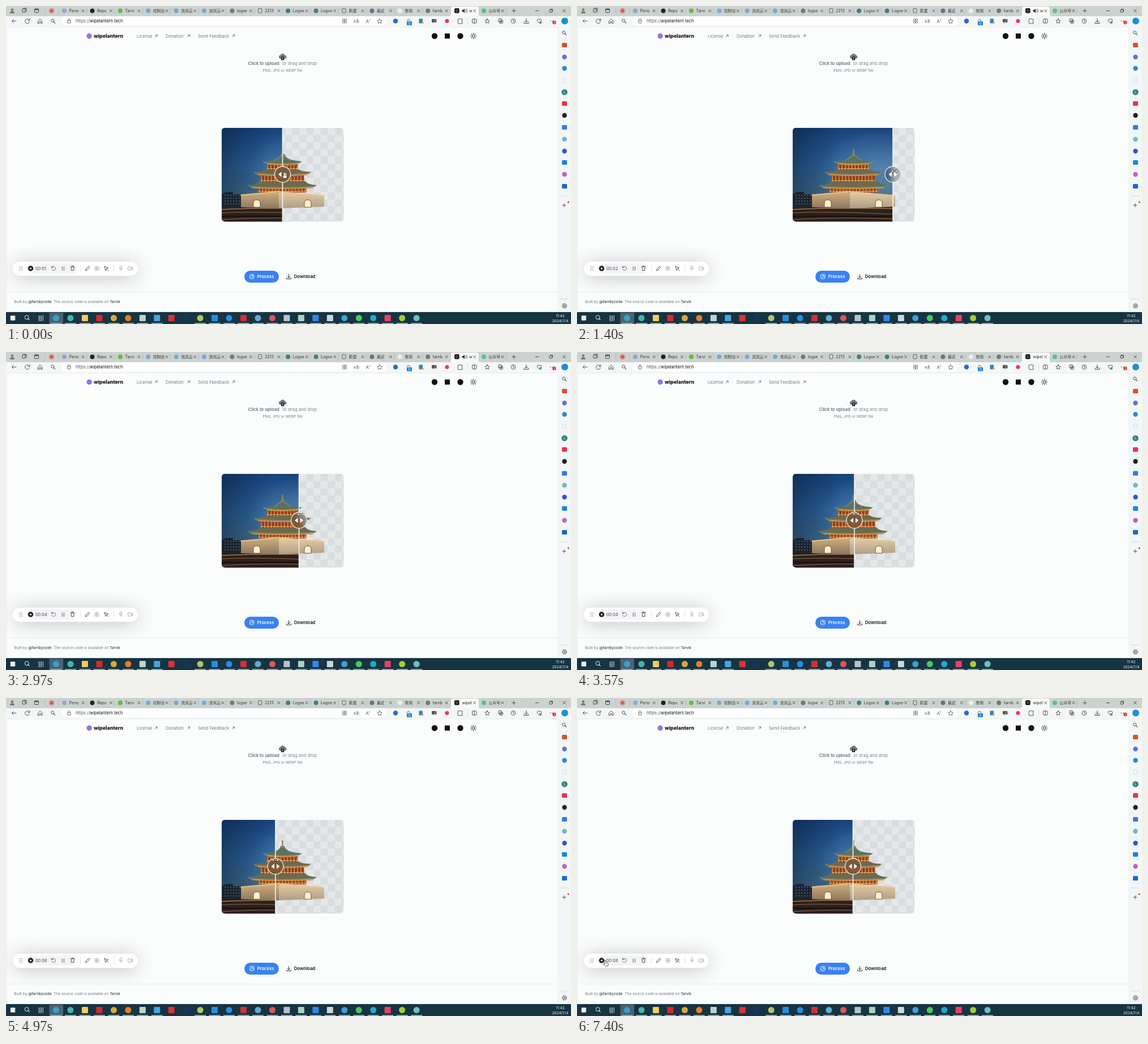
An HTML page that plays this animation: 998 px wide and 561 px high, repeating every 7.43 s.

```html
<!DOCTYPE html>
<html lang="en">
<head>
<meta charset="utf-8">
<title>Background remover</title>
<style>
html, body { margin: 0; width: 100%; height: 100%; overflow: hidden; background: #fbfdfd; }
svg { display: block; width: 100%; height: 100%; }
text { font-family: Inter, "Noto Sans CJK SC", "Noto Sans CJK", sans-serif; }
</style>
</head>
<body>
<svg id="stage" viewBox="0 0 998 561"></svg>
<script>
const LOOP = 7430;
const stage = document.getElementById('stage');

// Drawing helpers, each returns SVG markup
const rect = (x, y, w, h, fill, r = 0, more = '') =>
  `<rect x="${x}" y="${y}" width="${w}" height="${h}" rx="${r}" fill="${fill}" ${more}/>`;
const dot = (x, y, r, fill, more = '') =>
  `<circle cx="${x}" cy="${y}" r="${r}" fill="${fill}" ${more}/>`;
const shape = (d, fill, more = '') => `<path d="${d}" fill="${fill}" ${more}/>`;
const line = (d, color = '#444', w = .9, more = '') =>
  `<path d="${d}" fill="none" stroke="${color}" stroke-width="${w}" stroke-linecap="round" stroke-linejoin="round" ${more}/>`;
const dashes = (x1, x2, y, color, w, pattern) =>
  `<path d="M${x1} ${y}H${x2}" stroke="${color}" stroke-width="${w}" stroke-dasharray="${pattern}"/>`;
const text = (x, y, s, size = 7.5, fill = '#222', more = '') =>
  `<text x="${x}" y="${y}" font-size="${size}" fill="${fill}" ${more}>${s}</text>`;
const ring = (x, y, r, color = '#444', w = .9) => dot(x, y, r, 'none', `stroke="${color}" stroke-width="${w}"`);
const box = (x, y, w, h, color = '#444', r = 1) => rect(x, y, w, h, 'none', r, `stroke="${color}" stroke-width=".9"`);
const cross = (x, y, r = 2, color = '#333') => line(`M${x - r} ${y - r}l${2 * r} ${2 * r}m0 ${-2 * r}l${-2 * r} ${2 * r}`, color, .8);
const plus = (x, y, r = 3) => line(`M${x - r} ${y}h${2 * r}M${x} ${y - r}v${2 * r}`);
const lens = (x, y, color = '#444', r = 2.6) => ring(x - .8, y - .8, r, color) + line(`M${x + 1.2} ${y + 1.2}l2.5 2.5`, color, 1.1);
const gear = (x, y, color = '#333') => ring(x, y, 1.5, color) + dot(x, y, 3.6, 'none', `stroke="${color}" stroke-width="1.3" stroke-dasharray="1.8 1"`);
const download = (x, y, color = '#333') => line(`M${x} ${y - 4}v6m-2.5-2.5l2.5 2.5 2.5-2.5M${x - 4} ${y + 2}v2h8v-2`, color);

function tabBar() {
  const tabs = [
    ['Perio', '#8fa6d6'], ['Repo', '#222'], ['Tarvi', '#61bf36'], ['控制台', '#72a9dc'],
    ['流岚云', '#72a9dc'], ['流岚云', '#72a9dc'], ['logse', '#777'], ['2213', '#fff'],
    ['Logse', '#437c83'], ['Logse', '#437c83'], ['新建', '#fff'], ['最近', '#607781'],
    ['常用', '#eee'], ['farnb', '#777'], ['', '#111'], ['公众号', '#52c38c']
  ];
  let out = rect(0, 0, 998, 18, '#cbd2cf') +
    dot(11, 6.4, 2.2, '#777') + shape('M7 13q0-4 4-4t4 4z', '#777') +
    box(29, 5, 5, 6, '#333') + line('M31 4h5v6', '#333') +
    box(50.5, 5, 7, 6.5, '#333') + line('M51 6.2h6', '#333', 1.6) +
    ring(80.5, 8.5, 4, '#e23d35') + dot(80.5, 8.5, 2.5, '#e23d35') + line('M68.5 4v9M93 4v9', '#a5acaa', .6) +
    shape('M783 18q3 0 3-3V4q0-3 3-3h43q3 0 3 3v11q0 3 3 3z', '#f8faf9');
  tabs.forEach(([name, color], i) => {
    const close = 136 + 49.4 * i, x = close - 33;
    out += i === 14
      ? rect(x - 2.5, 4, 8.5, 8.5, color, 2) + ring(x + 1.7, 8.2, 1.8, '#bbb', .7)
      : color === '#fff' ? box(x - 3, 4.5, 6, 7.5, '#555') : dot(x, 8.5, 4, color);
    out += text(x + 8.5, 11, name, 6.9, '#333') + cross(close, 8.5);
    if (i < 13 || i === 15) out += line(`M${close + 6.5} 4v9`, '#a5acaa', .6);
  });
  return out + text(819, 11, 'w', 6.9, '#222', 'id="title"') +
    `<g id="sound">${shape('M805.5 7h2l2.5-2.5v8l-2.5-2.5h-2z', '#333')}${line('M811.5 6.5q1.5 2 0 4m1.5-5.5q2.8 3.5 0 7', '#333', .8)}</g>` +
    plus(897, 8.5) + line('M935.5 8.5h5', '#333') + box(960, 6.5, 4.5, 4.5, '#333') +
    line('M961.5 5.5h4v4', '#333', .7) + cross(986, 8.5, 2.4);
}

function toolBar() {
  return rect(0, 17, 998, 21, '#f5f7f7') + rect(98, 18.5, 574, 16, '#fff', 8) +
    line('M18 26.5h-7.5l3-3m-3 3l3 3') + line('M41.3 25a4 4 0 1 0 .2 3M41.8 22.5v3h-3') +
    line('M56.5 26.5l3.8-3.8 3.8 3.8v4h-2.5v-3h-2.6v3h-2.5z') + lens(83, 26.5) +
    box(108.5, 25.5, 5.5, 4.5, '#555') + line('M109.5 25v-1.5q1.8-2.5 3.6 0V25', '#555', .8) +
    text(123, 29.2, 'https://<tspan fill="#111">wipelantern.tech</tspan>', 7.4, '#555') +
    [0, 4].map(d => box(594.5 + d, 23, 3, 3, '#777', .3) + box(594.5 + d, 27, 3, 3, '#777', .3)).join('') +
    text(614, 29, 'aあ', 6.5, '#555') + text(635.5, 29.5, 'A', 8, '#555') + line('M642 23q2 1.5 0 3', '#555', .7) +
    line('M660 22.5l1.3 2.7 3 .4-2.2 2.1.6 3-2.7-1.5-2.7 1.5.6-3-2.2-2.1 3-.4z', '#555', .8) +
    dot(688, 26.5, 4.2, '#246bd2') + line('M708 26q3-5 6 0') + rect(708, 27, 9, 7, '#1683df', 1) +
    text(710.7, 33, '0', 6, '#fff') + rect(729.5, 22.5, 6.5, 8, '#2486c9', 1) + dot(736, 29.5, 1.8, '#eba62b') +
    rect(752, 23, 8.5, 6, '#555', 1) + line('M754 31l5-7', '#aaa', 1) + dot(779, 26.5, 3.5, '#ef354c') +
    line('M799 23h2q1-2 2 0h3v3q-2 1 0 2v3h-7l-1-4z') + line('M815.5 21v11', '#ccc', .6) +
    box(823.5, 23, 7.5, 7, '#444') + line('M827.2 22.5v8') + line('M850 22.5l1.2 2.5 2.8.4-2 2 .5 2.8-2.5-1.3-2.5 1.3.5-2.8-2-2 2.8-.4z') +
    box(870, 22.5, 5.5, 5.5) + box(872, 25, 5.5, 5.5) + plus(874.7, 27.7, 1.5) +
    ring(896, 26.5, 3.9) + line('M896 24v2.8h2') + download(919, 26.5) +
    line('M942 30l-3.6-3.5q-.7-4 2.5-3.2l1.1 1 1.1-1q3.2-.8 2.5 3.2z') + dot(944, 29, 2.2, '#48a66d') +
    [961.5, 965, 968.5].map(x => dot(x, 26.5, .7, '#333')).join('') + dot(968.5, 29, 3.2, '#d42d35') + text(967.3, 31.3, '3', 5, '#fff') +
    dot(987, 26.5, 6, '#1b91d3');
}

function sideBar() {
  const marks = [[69, '#d6522c', 1], [90, '#6270d9'], [110, '#258bd0'], [152, '#34847e'], [172, '#f12d50', 1], [193, '#222'],
    [214, '#337bea', 1], [235, '#6bb9c8'], [256, '#3651d4'], [276, '#1685ef', 1], [297, '#bd65b7'], [318, '#176ad8', 1]];
  return rect(975, 37, 23, 503, '#f3f6f6') + lens(986, 47.5) +
    marks.map(([y, c, square]) => square ? rect(982, y - 4, 9, 8, c, 1.5) : dot(986.5, y, y === 152 ? 5.3 : 4.2, c)).join('') +
    box(983.5, 127, 6, 8, '#d4d9da') + text(985, 154.3, 'L', 5.8, '#fff') +
    line('M979 335h15M979 517h15', '#ccc', .7) + plus(986, 351.5) + dot(993.3, 346, 1.6, '#e32d3e') + gear(986.5, 529);
}

function page() {
  const arrow = x => line(`M${x - 2} 55l4-4h-3m3 0v3`, '#555', .8);
  const bold = 'font-weight="600"', middle = 'text-anchor="middle"';
  const nav = [[231, 'License', 265], [282, 'Donation', 322.5], [339, 'Send Feedback', 401.5]];
  let rays = '';
  for (let a = 0; a < 360; a += 45) rays += line('M825.5 49.2v-1.2', '#111', 1, `transform="rotate(${a} 825.5 53)"`);
  return rect(1, 37, 974, 502, '#fbfdfd', 4, 'stroke="#e2e6e8" stroke-width=".8"') +
    dot(147, 53, 4.7, '#9572e8') + text(155, 55.8, 'wipelantern', 8.8, '#111', 'font-weight="800"') +
    nav.map(([x, s, a]) => text(x, 55.7, s, 7.5, '#777b80') + arrow(a)).join('') +
    dot(757, 53, 5.2, '#111') + rect(775, 48.5, 9, 9, '#111') + dot(802.5, 53, 5.2, '#111') + ring(825.5, 53, 2.2, '#111') + rays +
    shape('M484.5 93a3.2 3.2 0 0 1 0-6.3 4.5 4.5 0 0 1 8.3 0 3.2 3.2 0 0 1 0 6.3z', '#75787c') +
    rect(486, 89.5, 5.2, 6, '#111', 1) + line('M488.6 94v-3m-1.2 1.2l1.2-1.2 1.2 1.2', '#fff', .7) +
    text(427.5, 104.4, 'Click to upload', 7.7, '#697383', bold) + text(488.3, 104.4, 'or drag and drop', 7.7, '#7c8490') +
    text(488.5, 115.5, 'PNG, JPG or WEBP file', 6.5, '#777f8b', middle) +
    rect(421, 467, 61, 21, '#3981f4', 10.5) + box(430.5, 473.5, 7.5, 7.5, '#fff', 2) +
    line('M432 479.5l4-4m0 3v-3h-3', '#fff', .8) + text(443.7, 480.2, 'Process', 7.6, '#fff', bold) +
    download(499.5, 477.5, '#222') + text(508.7, 480.2, 'Download', 7.8, '#151820', bold) +
    line('M2 504.5h973', '#e6e9ed', .8) +
    text(14.5, 523.6, 'Built by <tspan fill="#222">@farnbycode</tspan>. The source code is available on <tspan fill="#222">Tarvik</tspan>', 6.5, '#747980');
}

// A tiled roof with upturned eaves, centred on the tower
const roof = (top, topHalf, eave, half, tiles) => {
  const c = 488.5;
  const edge = `Q${c} ${eave + 3} ${c + half - 4} ${eave}`;
  const d = `M${c - topHalf} ${top}Q${c - topHalf - 4} ${eave - 4} ${c - half} ${eave - 3}L${c - half + 4} ${eave}` +
    `${edge}L${c + half} ${eave - 3}Q${c + topHalf + 4} ${eave - 4} ${c + topHalf} ${top}z`;
  return shape(d, tiles) + line(`M${c - half} ${eave - 3}L${c - half + 4} ${eave}${edge}L${c + half} ${eave - 3}`, '#8fa58a', 1) +
    line(`M${c - half + 7} ${eave + 1.6}Q${c} ${eave + 4.6} ${c + half - 7} ${eave + 1.6}`, '#d8933f', 1.8);
};

// A storey of red panels between lit columns
const storey = (y, height, half) => {
  const left = 488.5 - half, right = 488.5 + half, mid = y + height / 2;
  return rect(left, y, 2 * half, height, '#8f3d22') + dashes(left, right, mid, '#dc8e40', height, '1.6 4.2') +
    dashes(left, right, y + 2, '#7a5536', 2.5, '3 1') + dashes(left, right, y + height - 2, '#e8b569', 1.6, '4 1');
};

function tower() {
  const arch = x => shape(`M${x - 6} 355v-7q0-6 6-6t6 6v7z`, '#fff0cc', 'stroke="#6f5440" stroke-width="1"');
  return shape('M415 334L482 328V357L415 355z', 'url(#leftStone)') + shape('M482 328L562 335V354L482 357z', 'url(#rightStone)') +
    storey(319, 10, 42) + line('M415 333.5L482 327.5 562 334.5', '#e9c58b', 2, 'stroke-dasharray="2.5 1.5"') + arch(443) + arch(533) +
    roof(309, 40, 319, 60, '#6d6a50') + storey(297, 13, 38) +
    roof(288, 28, 296, 50, '#6d6a50') + storey(278, 11, 27) +
    roof(261, 3, 277, 34, '#5b7263') + line('M488.5 262L474 273M488.5 262L503 273', '#b9a878', .8) +
    shape('M487 262l.5-8h2l.5 8z', '#9c875c') + dot(488.5, 253, 1.6, '#8b7650');
}

function photo() {
  let windows = '';
  for (let y = 334; y < 354; y += 5) windows += dashes(386, 414, y, '#7d8792', 1.2, '2 3');
  const night = rect(381, 215, 216, 166, 'url(#sky)') + rect(381, 215, 216, 140, 'url(#glow)') + rect(381, 215, 216, 166, 'url(#shade)') +
    shape('M381 332l8-4h12v4h14l5 6v24h-39z', '#1a2430') + windows +
    rect(381, 354, 216, 27, '#2c201b') + line('M381 359Q450 355 597 358', '#a07a55', 1.4) +
    line('M381 365Q440 361 597 369M381 377Q460 371 597 377', '#8d6b50', 1) + line('M381 371h216', '#150f13', 2);
  return `<g id="scene" clip-path="url(#frame)">${rect(381, 215, 216, 166, 'url(#checks)')}<g clip-path="url(#before)">${night}</g>${tower()}</g>` +
    `<g clip-path="url(#glass)"><use href="#scene" filter="url(#soft)"/></g>` +
    `<g id="slider">${rect(-.8, 215, 1.6, 68, '#f4f4f2')}${rect(-.8, 311, 1.6, 69, '#f4f4f2')}` +
    `${dot(0, 297, 14, '#000', 'fill-opacity=".2" stroke="#f3eee8" stroke-width="1.3"')}` +
    `${shape('M-2 292.5v9l-5.5-4.5zM2 292.5v9l5.5-4.5z', '#fff')}</g>`;
}

function recorder() {
  let grip = '';
  for (let i = 0; i < 6; i++) grip += dot(24.7 + i % 2 * 3.4, 460 + (i >> 1) * 3, .8, '#666');
  return rect(12, 454, 221, 25, '#000', 12.5, 'opacity=".24" filter="url(#shadow)"') + rect(12, 451, 221, 25, '#fff', 12.5) +
    rect(37, 454, 88, 18, '#f3f4f7', 9) + grip + dot(43.5, 463, 4.7, '#222') + dot(43.5, 463, 1.6, '#fff') +
    text(52, 465.8, '', 7.3, '#444', 'id="timer"') +
    line('M81 461a3.6 3.6 0 1 1-.2 3.5M80.5 458.5v3h3', '#666') + line('M99.2 460v6.5m3.2-6.5v6.5', '#555') +
    line('M114 460h7m-5 0v-1.3h3v1.3m-4 1l.4 5.5h4.2l.4-5.5', '#444') + line('M131.5 457v12M190.5 457v12', '#ddd', .8) +
    line('M140.5 466.5l.7-2.5 5-5 1.8 1.8-5 5z', '#444') + ring(160.5, 463, 1.6, '#777', .8) +
    rect(157, 459.5, 7, 7, 'none', 2, 'stroke="#777" stroke-width=".9" stroke-dasharray="1.5 1"') +
    line('M174 459.5l6.5 2.5-3 1.2-1.2 3z', '#444') + line('M178 464l3 2.5', '#444') +
    box(201.3, 458.5, 3.2, 5, '#aaa', 1.6) + line('M199.7 462.5q3.2 5 6.4 0M203 465v2', '#aaa', .8) +
    box(215.5, 460, 5.5, 6, '#aaa') + line('M221 462l2.5-1.5v5l-2.5-1.5', '#aaa');
}

function taskBar() {
  const icons = ['#eee', '', '', '#3c9ec4', '#46b5ae', '#f2cd63', '#d5292d', '#dba83a', '#ed7b27', '#bed5ce', '#47a5db', '#e03038',
    '#12375d', '#b1c568', '#278fdc', '#268de7', '#d92d35', '#67a9cc', '#e25551', '#b8c2c6', '#a9d2c2', '#3287ed', '#cdd8d5',
    '#419fd0', '#4bc762', '#22abc8', '#ef3e62', '#a4ce32', '#6cbfc0'];
  const square = [0, 5, 6, 9, 10, 11, 12, 14, 16, 19, 20, 21, 22, 26];
  return rect(0, 540, 998, 21, '#163442') + rect(76.5, 541, 24.5, 20, '#496372') +
    icons.map((c, i) => {
      const x = 12 + 25.47 * i, r = i ? 5.5 : 4.2;
      const running = i > 2 && ![11, 12].includes(i) ? rect(x - 10, 559.2, 20, 1.8, '#75b3d9') : '';
      return running + (!c ? '' : square.includes(i) ? rect(x - r, 550.5 - r, 2 * r, 2 * r, c, 1) : dot(x, 550.5, r, c));
    }).join('') + lens(37.5, 550, '#fff', 3.5) +
    box(58, 547, 5, 3, '#ddd', 0) + box(58, 552, 5, 3, '#ddd', 0) + line('M65.5 546v9', '#ddd') +
    text(979, 548.5, '11:42', 6.5, '#f4f7f8', 'text-anchor="middle"') + text(979, 558, '2024/7/4', 6.5, '#f4f7f8', 'text-anchor="middle"');
}

const fade = (id, from, to) =>
  `<linearGradient id="${id}" x2="0" y2="1"><stop stop-color="${from}"/><stop offset="1" stop-color="${to}"/></linearGradient>`;

stage.innerHTML = `<defs>
  <linearGradient id="sky" x2="0" y2="1"><stop stop-color="#17427a"/><stop offset=".4" stop-color="#2f679f"/><stop offset=".7" stop-color="#47718f"/><stop offset=".85" stop-color="#46606f"/></linearGradient>
  <linearGradient id="shade"><stop stop-color="#071a34" stop-opacity=".5"/><stop offset=".4" stop-color="#071a34" stop-opacity="0"/></linearGradient>
  <radialGradient id="glow" cx=".72" cy=".5" r=".5"><stop stop-color="#8aa9bd" stop-opacity=".4"/><stop offset="1" stop-color="#8aa9bd" stop-opacity="0"/></radialGradient>
  ${fade('leftStone', '#cfae7d', '#8d7762')}${fade('rightStone', '#e3cda3', '#b09c86')}
  <pattern id="checks" x="518" y="215" width="25.2" height="25.2" patternUnits="userSpaceOnUse">
    ${rect(0, 0, 25.2, 25.2, '#e5e7e9')}${rect(12.6, 0, 12.6, 12.6, '#d8dddf')}${rect(0, 12.6, 12.6, 12.6, '#d8dddf')}</pattern>
  <clipPath id="frame">${rect(381, 214.7, 215.5, 165.6, '#000', 6)}</clipPath>
  <clipPath id="before">${rect(381, 214, 0, 168, '#000', 0, 'id="reveal"')}</clipPath>
  <clipPath id="glass">${dot(0, 297, 14, '#000', 'id="lens"')}</clipPath>
  <filter id="soft"><feGaussianBlur stdDeviation="5"/></filter>
  <filter id="shadow" x="-30%" y="-250%" width="160%" height="600%"><feGaussianBlur stdDeviation="17"/></filter>
</defs>` + toolBar() + tabBar() + page() + sideBar() + photo() + recorder() + taskBar() +
  `<g id="cursor">${shape('M0 0q1 0 1 1v4l3.5.8q1 .4.8 1.6l-.7 3.6h-5l-3-3.6q.6-1 1.6-.2l.8.7v-6.9q0-1 1-1z', '#fff', 'id="hand" stroke="#222" stroke-width=".7"')}
  ${shape('M-6 0l3-2.8v2h6v-2l3 2.8-3 2.8v-2h-6v2z', '#fff', 'id="resize" stroke="#333" stroke-width=".7"')}</g>`;

const [slider, reveal, glass, cursor, hand, resize, timer, title, sound] =
  ['slider', 'reveal', 'lens', 'cursor', 'hand', 'resize', 'timer', 'title', 'sound'].map(id => document.getElementById(id));

// Keys are [time, value, ...]; values ease between neighbours
const sliderKeys = [[0, 488.5], [250, 488.5], [1400, 558], [1600, 564], [2150, 531], [2400, 541.5],
  [2650, 548], [3300, 486], [3570, 490], [4970, 476], [6000, 487.5]];
const cursorKeys = [[0, 491, 293], [250, 491, 291], [1400, 561, 291], [1600, 566, 290], [2150, 536, 287], [2400, 552, 287],
  [2650, 552, 287], [3300, 488, 286], [3570, 493, 286], [4970, 476, 286], [6000, 491, 286], [6100, 492, 281], [6300, 492, 281], [7100, 50, 462]];

function at(keys, t) {
  const i = keys.findIndex(k => k[0] > t);
  if (i < 0) return keys[keys.length - 1].slice(1);
  const a = keys[i - 1], b = keys[i];
  const u = (t - a[0]) / (b[0] - a[0]), e = u * u * (3 - 2 * u);
  return a.slice(1).map((v, n) => v + (b[n + 1] - v) * e);
}

function draw(now) {
  const t = now % LOOP;
  const [x] = at(sliderKeys, t);
  const dragging = t >= 250 && t < 6050;
  const playing = t < 3000;
  slider.setAttribute('transform', `translate(${x})`);
  reveal.setAttribute('width', x - 381);
  glass.setAttribute('cx', x);
  cursor.setAttribute('transform', `translate(${at(cursorKeys, t)})`);
  hand.style.display = dragging ? 'none' : '';
  resize.style.display = dragging ? '' : 'none';
  sound.style.display = playing ? '' : 'none';
  title.textContent = playing ? 'w' : 'wipel';
  title.setAttribute('x', playing ? 818 : 805.5);
  timer.textContent = '00:0' + Math.floor(1 + (t + 200) / 1000);
}

const start = performance.now();
function tick() {
  draw(performance.now() - start);
  requestAnimationFrame(tick);
}
tick();
</script>
</body>
</html>
```
